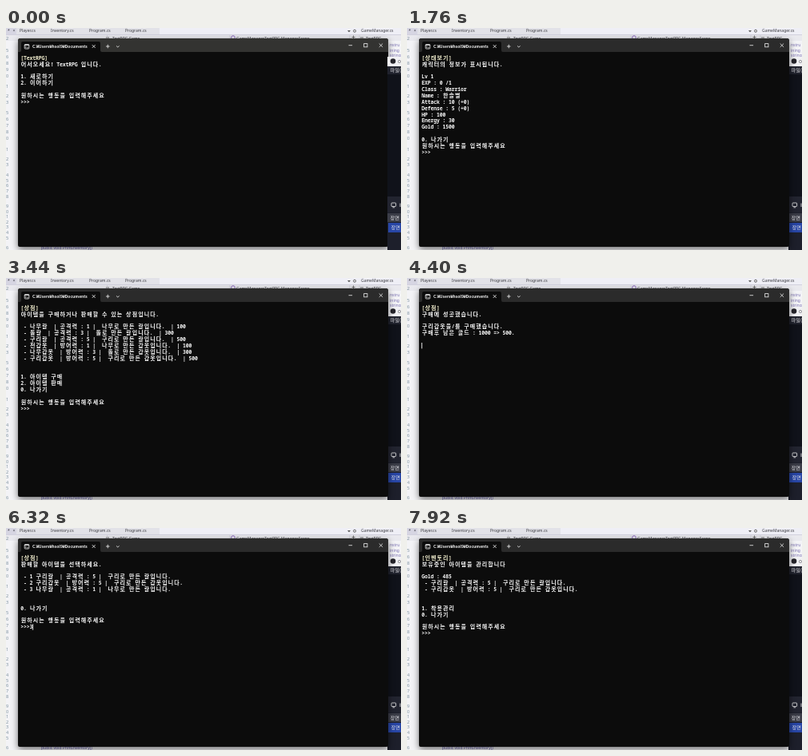
Recreate the animation shown at these times as an HTML page. Size 494 px wide and 278 px high, loop 8 s.

```html
<!DOCTYPE html>
<html lang="ko">
<head>
<meta charset="utf-8">
<style>
  html, body { margin: 0; width: 100%; height: 100%; overflow: hidden; background: #f0f0f3; }
  svg { display: block; width: 100vw; height: 100vh; }
  text { white-space: pre; }
  .ui { font-family: "Noto Sans", "Noto Sans CJK KR", sans-serif; font-size: 5px; fill: #3a3a40; }
  .num { font-size: 5.6px; fill: #7f929e; }
  .ko { font: 500 6.2px "Noto Sans CJK KR", sans-serif; fill: #e6e6ea; }
  .title { font: 600 5px "Noto Sans CJK KR", "Noto Sans", sans-serif; fill: #fff; }
  .term text { fill: #f6f6f6; }
  .term .head { fill: #f4f0d0; }
  .a { font: 700 6.5px "Noto Sans Mono", monospace; }
  .h { font: 700 7px "Noto Sans CJK KR", sans-serif; }
  .line { fill: none; stroke: #f0f0f0; stroke-width: .8; }
</style>
</head>
<body>
<svg viewBox="0 0 494 278" preserveAspectRatio="none">
  <defs>
    <filter id="blur" x="-10%" y="-10%" width="120%" height="120%">
      <feGaussianBlur stdDeviation="4.5"/>
    </filter>
    <g id="panel">
      <rect x="477" y="36" width="17" height="242" fill="#1d1f2b"/>
      <rect x="477" y="36" width="17" height="12" fill="#f1f1f4"/>
      <circle cx="484" cy="41.500" r="3.300" fill="#25242a"/>
      <text class="ui" x="490" y="43.600">O</text>
      <rect x="477" y="48" width="17" height="10" fill="#20222d"/>
      <text class="ko" x="480.500" y="55.300">파일(F)</text>
      <rect x="477" y="58" width="17" height="153" fill="#10121a"/>
      <rect x="477" y="211" width="17" height="20" fill="#222430"/>
      <rect class="line" x="482" y="219" width="5.600" height="4.500" rx=".8"/>
      <path class="line" d="M483.500 224.800h2.600M493 219.500v4.500"/>
      <rect x="477" y="232" width="17" height="11" fill="#3b3d48"/>
      <text class="ko" x="480.500" y="239.800">장면</text>
      <rect x="478" y="244" width="16" height="12" fill="#2846a6"/>
      <text class="ko" x="481.500" y="252.300">장면</text>
    </g>
  </defs>

  <!-- editor behind -->
  <rect width="494" height="278" fill="#f3f3f6"/>
  <rect width="494" height="8" fill="#efeff6"/>
  <rect width="192" height="8" fill="#e2e2e8"/>
  <rect width="13" height="8" fill="#d6d5e2"/>
  <rect y="8" width="494" height="1" fill="#d2d1de"/>
  <rect y="9" width="494" height="7" fill="#e9e9ee"/>
  <g class="ui">
    <text x="2" y="5">*</text><text x="8.5" y="5.2">×</text>
    <text x="17" y="5">Player.cs</text>
    <text x="56" y="5">Inventory.cs</text>
    <text x="104" y="5">Program.cs</text>
    <text x="149" y="5">Program.cs</text>
    <text x="444" y="5">GameManager.cs</text>
    <text x="133" y="14.500">TextRPG.Game</text>
    <text x="288" y="14.500">GameManager.TextRPG.Manager.Scene</text>
    <text x="450" y="14.500">TextRPG</text>
  </g>
  <path d="M427 3h4l-2 2.2z" fill="#555"/>
  <circle cx="436" cy="3.700" r="1.500" fill="none" stroke="#555" stroke-width=".9"/>
  <path d="M125 12h4M434.500 9.500v4M432.500 11.500h4M443 12h4" stroke="#666" stroke-width=".9"/>
  <circle cx="284" cy="12" r="2.300" fill="none" stroke="#7d58b5" stroke-width=".9"/>
  <path d="M126.500 9v6M280 9v6M430 9v6M442 9v6" stroke="#c6c6d0" stroke-width=".6"/>
  <g id="nums" class="ui num"></g>
  <text class="ui" x="44" y="276.800" style="fill:#5a55a8">public void PrintInventory()</text>
  <g class="ui" style="fill:#7a70b0">
    <text x="480" y="23">nstru</text><text x="480" y="30">ining</text><text x="480" y="36">string</text>
  </g>

  <g id="panelBack"></g>

  <g class="term">
    <rect x="15" y="16" width="463" height="261" rx="3" opacity=".55" filter="url(#blur)"/>
    <path d="M15 272V16q0-3 3-3h457q3 0 3 3v256q0 2-2 2H17q-2 0-2-2z" fill="#0c0c0c"/>
    <path id="bar" d="M15 30V16q0-3 3-3h457q3 0 3 3v14z" fill="#333"/>
    <path d="M17 30q2 0 2-2v-9q0-2 2-2h95q2 0 2 2v9q0 2 2 2z" fill="#0c0c0c"/>
    <rect class="line" x="23.200" y="20.500" width="5.600" height="5.500" rx=".8"/>
    <path class="line" d="M23 21.500h6M24.300 23l1 .8-1 .8M26.200 24.800h1.500"/>
    <text class="title" x="33" y="25.200">C:₩Users₩hsol9₩Documents</text>
    <path class="line" d="M107.700 21l4 4m0-4l-4 4M125 23h4.600m-2.300-2.300v4.600M138 22.400l1.800 1.600 1.800-1.600M428.500 21.700h4.600M466.700 19.500l4.400 4.400m0-4.400l-4.400 4.400"/>
    <rect class="line" x="447.700" y="19.600" width="4.200" height="4.200"/>
    <g id="rows"></g>
    <rect id="caret" width=".9" height="7.400" fill="#f0f0f0"/>
  </g>

  <g id="panelFront"></g>
</svg>
<script>
const NS = "http://www.w3.org/2000/svg";
const LOOP = 8000, X0 = 18.2, CELL = 3.755, Y0 = 39.7, PITCH = 7.87;
const $ = id => document.getElementById(id);
const add = (parent, tag, attrs, text = "") => {
  const el = document.createElementNS(NS, tag);
  for (const k in attrs) el.setAttribute(k, attrs[k]);
  el.textContent = text;
  return parent.appendChild(el);
};

// gutter digits: groups of lines at a shared pitch [first y, step, digits]
[[15, 8, "2"], [29.5, 8.1, "56890"], [75, 8, "1"], [87, 8, "23"], [108, 8, "56780"],
 [154, 8, "1"], [166, 7, "23"], [186, 6.7, "45678"], [225, 6.6, "9012345"], [277, 6, "6"]]
  .forEach(([y, step, digits]) => [...digits].forEach((d, i) =>
    add($("nums"), "text", { x: 0, y: y + i * step }, d)));

const panels = ["panelBack", "panelFront"].map(id => add($(id), "use", { href: "#panel" }));

// screens
const ASK = ["", "원하시는 행동을 입력해주세요", ">>>"];
const item = (name, stat, power, made, kind, cost) =>
  ({ name, cost, info: `${name}  | ${stat} : ${power} |  ${made}로 만든 ${kind}입니다.` });
const sword = (n, p, m, c) => item(n, "공격력", p, m, "칼", c);
const armor = (n, p, m, c) => item(n, "방어력", p, m, "갑옷", c);
const goods = [
  sword("나무칼", 1, "나무", 100), sword("돌칼", 3, "돌", 300), sword("구리칼", 5, "구리", 500),
  armor("천갑옷", 1, "나무", 100), armor("나무갑옷", 3, "돌", 300), armor("구리갑옷", 5, "구리", 500)
];
const owned = [goods[2], goods[5], goods[0]];
const priced = (g, n = "") => ` - ${n}${g.info}  | ${g.cost}`;
const deal = (verb, g, from, to) => ["[상점]", `${verb}에 성공했습니다.`, "",
  `${g.name}을/를 ${verb}했습니다.`, `${verb}후 남은 골드 : ${from} => ${to}.`, "", ""];

const screens = {
  title: ["[TextRPG]", "어서오세요! TextRPG 입니다.", "", "1. 새로하기", "2. 이어하기", ...ASK],
  name: ["[TextRPG]", "이름을 입력해주세요", "", ">>>"],
  menu: ["[TextRPG]", "", "1. 상태보기", "2. 인벤토리", "3. 상점", ...ASK],
  status: ["[상태보기]", "캐릭터의 정보가 표시됩니다.", "", "Lv 1", "EXP : 0 /1", "Class : Warrior",
    "Name : 한솔별", "Attack : 10 (+0)", "Defense : 5 (+0)", "HP : 100", "Energy : 30",
    "Gold : 1500", "", "0. 나가기", ASK[1], ASK[2]],
  shop: ["[상점]", "아이템을 구매하거나 판매할 수 있는 상점입니다.", "", ...goods.map(g => priced(g)),
    "", "", "1. 아이템 구매", "2. 아이템 판매", "0. 나가기", ...ASK],
  buy: ["[상점]", "구매할 아이템을 선택하세요.", "", ...goods.map((g, i) => priced(g, i + 1 + " ")),
    "", "", "0. 나가기", ...ASK],
  bought1: deal("구매", goods[2], 1500, 1000),
  bought2: deal("구매", goods[5], 1000, 500),
  bought3: deal("구매", goods[0], 500, 400),
  sell: ["[상점]", "판매할 아이템을 선택하세요.", "", ...owned.map((g, i) => ` - ${i + 1} ${g.info}`),
    "", "", "0. 나가기", ...ASK],
  sold: deal("판매", goods[0], 400, 485),
  bag: ["[인벤토리]", "보유중인 아이템을 관리합니다", "", "Gold : 485",
    ...owned.slice(0, 2).map(g => " - " + g.info), "", "", "1. 착용관리", "0. 나가기", ...ASK]
};

// time, screen, typed input, caret shown
const steps = [
  [0, "title", "", 0], [480, "title", "1", 1],
  [560, "name", "", 1], [720, "name", "한", 1], [800, "name", "한솔", 1], [880, "name", "한솔별", 1],
  [1040, "menu", "", 0], [1520, "menu", "1", 1],
  [1680, "status", "", 0], [2240, "status", "0", 1],
  [2320, "menu", "", 0], [2720, "menu", "3", 1],
  [2800, "shop", "", 0], [3520, "shop", "1", 1],
  [3600, "buy", "", 0], [3760, "buy", "3", 1], [3840, "bought1", "", 1],
  [4160, "buy", "", 0], [4320, "buy", "6", 1], [4400, "bought2", "", 1],
  [4720, "buy", "", 0], [4880, "buy", "1", 1], [4960, "bought3", "", 1],
  [5600, "shop", "", 0], [5840, "shop", "2", 1],
  [5920, "sell", "", 0], [6240, "sell", "3", 1], [6480, "sold", "", 1],
  [6800, "shop", "", 0], [6880, "shop", "0", 1],
  [6960, "menu", "", 0], [7120, "menu", "2", 1], [7200, "bag", "", 0]
];

const isWide = c => /[가-힣]/.test(c);

// Sets one row on the terminal grid and returns the column after it.
function putRow(line, row) {
  const el = add($("rows"), "text", { y: Y0 + row * PITCH, class: row ? "" : "head" });
  let col = 0;
  for (const run of line.match(/[가-힣]+|[^가-힣]+/g) || []) {
    const wide = isWide(run);
    const xs = [...run].map(() => {
      const x = X0 + col * CELL + (wide ? .5 : 0);
      col += wide ? 2 : 1;
      return x.toFixed(2);
    });
    add(el, "tspan", { x: xs.join(" "), class: wide ? "h" : "a" }, run);
  }
  return col;
}

function show([, name, typed, caret]) {
  $("rows").textContent = "";
  const lines = screens[name], last = lines.length - 1;
  let col = 0;
  lines.forEach((line, i) => { col = putRow(i === last ? line + typed : line, i); });
  $("caret").setAttribute("x", X0 + col * CELL);
  $("caret").setAttribute("y", Y0 + last * PITCH - 5.9);
  $("caret").style.display = caret ? "" : "none";
}

const start = performance.now();
let current;
function tick() {
  const t = Math.max(0, performance.now() - start) % LOOP;
  const step = steps.findLast(s => s[0] <= t);
  if (step !== current) show(current = step);
  const focused = t >= 240;
  $("bar").setAttribute("fill", focused ? "#2b2b2b" : "#333331");
  panels[0].style.display = focused ? "" : "none";
  panels[1].style.display = focused ? "none" : "";
  requestAnimationFrame(tick);
}
tick();
</script>
</body>
</html>
```
